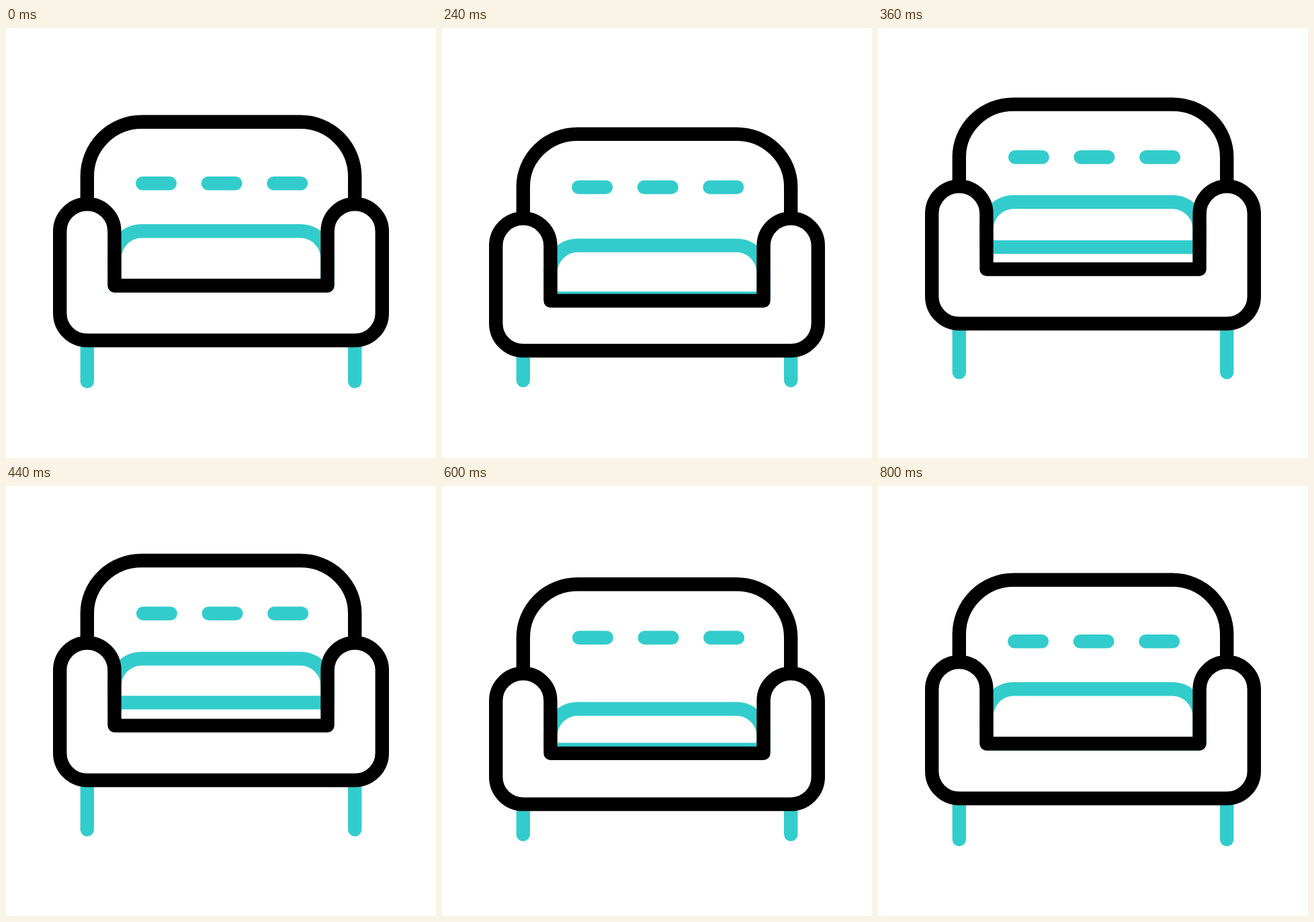
Animation of 640 by 640 pixels, one loop 1.48 s. Source, as an HTML page with a canvas:

```html
<!DOCTYPE html>
<html lang="en">
<head>
<meta charset="utf-8">
<title>Jumping sofa</title>
<style>
  html, body { margin: 0; width: 100%; height: 100%; overflow: hidden; background: #fff; }
  canvas { display: block; }
</style>
</head>
<body>
<canvas id="stage" width="640" height="640"></canvas>
<script>
const ctx = document.getElementById('stage').getContext('2d');
const LOOP = 1480, STEP = 40;
const TEAL = '#33cccc', BLACK = '#000';
const START = 120, DIP = 200, PEAK = 400, LAND = 645, END = 800;

// Sine ease-in-out from 0 to 1.
function ease(t, from, to) {
  const u = Math.min(1, Math.max(0, (t - from) / (to - from)));
  return (1 - Math.cos(Math.PI * u)) / 2;
}

// Height of a part that crouches, jumps, lands and settles back at rest.
function hop(t, rest, dip, peak, land) {
  return rest + dip * ease(t, START, DIP) + (peak - dip) * ease(t, DIP, PEAK) +
    (land - peak) * ease(t, PEAK, LAND) - land * ease(t, LAND, END);
}

function stroke(color, build, cap = 'round') {
  ctx.strokeStyle = color;
  ctx.lineCap = cap;
  ctx.beginPath();
  build();
  ctx.stroke();
}

function line(x1, y1, x2, y2) {
  stroke(TEAL, () => { ctx.moveTo(x1, y1); ctx.lineTo(x2, y2); });
}

function spark(t, x1, y1, x2, y2) {
  const a = ease(t, 680, END), b = ease(t, 600, 712);
  if (b <= a) return;
  const dx = x2 - x1, dy = y2 - y1;
  line(x1 + dx * a, y1 + dy * a, x1 + dx * b, y1 + dy * b);
}

function draw(t) {
  const L = 120.8, R = 519.2, inL = 161.5, inR = 478.5, outL = 80.2, outR = 559.8;
  const r = 40.6, bigR = 81;
  const back = hop(t, 139.8, 23.3, -31.4, 9.8);
  const shoulder = hop(t, 220.8, 20.5, -34, 8);
  const dash = hop(t, 231.2, 11, -44.2, -2);
  const arm = hop(t, 262, 27, -32, 21.3);
  const seat = hop(t, 383.5, 28, -30, 18.3);
  const base = hop(t, 465, 20, -29.7, 12);
  const top = hop(t, 302.3, 29, -51, 36.5);
  const pad = hop(t, 383.5, 28, -66.4, 15.5);
  const foot = 526 - 15 * (ease(t, DIP, PEAK) - ease(t, PEAK, END));
  const drift = 0.9 * (ease(t, DIP, PEAK) - ease(t, 680, END));

  ctx.fillStyle = '#fff';
  ctx.fillRect(0, 0, 640, 640);
  ctx.lineWidth = 20.4;
  ctx.lineJoin = 'round';

  for (const x of [L, R]) line(x, base, x, foot);
  for (let i = 0; i < 3; i++) {
    const x = 203.2 + i * 97.6 + drift;
    line(x, dash, x + 40.6, dash);
  }

  stroke(TEAL, () => {
    ctx.moveTo(inL, pad);
    ctx.arcTo(inL, top, inR, top, r);
    ctx.arcTo(inR, top, inR, pad, r);
    ctx.lineTo(inR, pad);
    ctx.closePath();
  });

  stroke(BLACK, () => {
    const ry = shoulder - back;
    ctx.moveTo(L, arm);
    ctx.ellipse(L + bigR, shoulder, bigR, ry, 0, Math.PI, Math.PI * 1.5);
    ctx.ellipse(R - bigR, shoulder, bigR, ry, 0, Math.PI * 1.5, Math.PI * 2);
    ctx.lineTo(R, arm);
  }, 'butt');

  stroke(BLACK, () => {
    ctx.moveTo(inL, seat);
    ctx.arc(L, arm + r, r, 0, Math.PI, true);
    ctx.arcTo(outL, base, L, base, r);
    ctx.arcTo(outR, base, outR, arm + r, r);
    ctx.arc(R, arm + r, r, 0, Math.PI, true);
    ctx.lineTo(inR, seat);
    ctx.closePath();
  });

  spark(t, 88, 523, 30, 500.8);
  spark(t, 554, 523.6, 600, 500.4);
}

const start = performance.now();
function tick() {
  const t = (performance.now() - start) % LOOP;
  draw(Math.floor(t / STEP) * STEP);
  requestAnimationFrame(tick);
}
tick();
</script>
</body>
</html>
```
